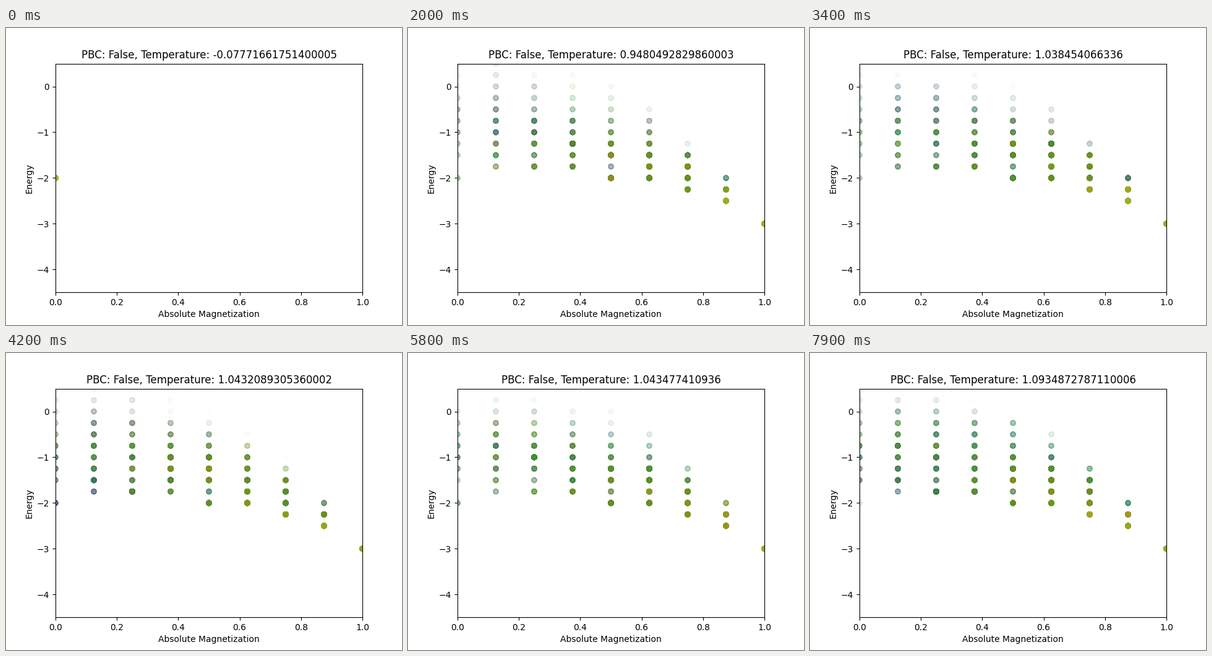
Recreate the animation shown at these times as a matplotlib script. Size 640x480 px, loop 8000 ms.

```python
import math
import random

import numpy as np
import matplotlib.pyplot as plt
from matplotlib.animation import FuncAnimation

SIDE, SPINS, STEPS, FRAMES = 4, 16, 10000, 80
ALPHA, RECENT, EARLY = 0.01, 160, 40

# quintic sweep that lingers near the critical point
temps = [float(t) for t in
         1000 * (np.arange(-0.257, 0.2, 0.005)[:FRAMES]) ** 5 + 1.043438275543]


def neighbours(i):
    r, c = divmod(i, SIDE)
    cells = ((r - 1, c), (r + 1, c), (r, c - 1), (r, c + 1))
    return [y * SIDE + x for y, x in cells if 0 <= y < SIDE and 0 <= x < SIDE]


LINKS = [neighbours(i) for i in range(SPINS)]


def metropolis(spins, temp, rng):
    """Run single-spin updates in place; return magnetisation and energy sums."""
    heat = max(temp, 1e-3)
    accept = {k: math.exp(-k / heat) if k > 0 else 1.0 for k in range(-4, 5)}
    mag = sum(spins)
    energy = -sum(spins[i] * spins[j] for i in range(SPINS) for j in LINKS[i]) // 2
    mags, energies = [], []
    rand = rng.random
    for _ in range(STEPS):
        i = int(rand() * SPINS)
        s = spins[i]
        field = 0
        for j in LINKS[i]:
            field += spins[j]
        field *= s
        if field <= 0 or rand() < accept[field]:
            spins[i] = -s
            mag -= 2 * s
            energy += 2 * field
        mags.append(abs(mag))
        energies.append(energy)
    return np.array(mags), np.array(energies)


def thin(mags, energies):
    """Drop hidden layers of crowded cells, keeping a few stronger early ones."""
    keep, alphas = [], []
    keys = mags * 100 + energies
    for key in np.unique(keys):
        idx = np.flatnonzero(keys == key)
        weight = np.full(len(idx), ALPHA)
        if len(idx) > RECENT + EARLY:
            old = idx[:-RECENT]
            old = old[np.linspace(0, len(old) - 1, EARLY).astype(int)]
            idx = np.concatenate([old, idx[-RECENT:]])
            weight = np.repeat([0.08, ALPHA], [EARLY, RECENT])
        keep.append(idx)
        alphas.append(weight)
    keep, alphas = np.concatenate(keep), np.concatenate(alphas)
    return keep, alphas


def simulate():
    rng = random.Random(11)
    spins = [1] * (SPINS // 2) + [-1] * (SPINS // 2)
    runs = []
    for temp in temps:
        mags, energies = metropolis(spins, temp, rng)
        keep, alphas = thin(mags, energies)
        points = np.column_stack([mags[keep] / SPINS, 2 * energies[keep] / SPINS])
        colors = plt.cm.viridis(keep / (STEPS - 1))
        colors[:, 3] = alphas
        runs.append((points, colors))
    return runs


runs = simulate()

fig, ax = plt.subplots(figsize=(6.4, 4.8), dpi=100)
ax.set(xlim=(0, 1), ylim=(-4.5, 0.5),
       xlabel="Absolute Magnetization", ylabel="Energy")
dots = ax.scatter([0], [0])
title = ax.set_title("")


def update(frame):
    points, colors = runs[frame]
    dots.set_offsets(points)
    dots.set_color(colors)
    title.set_text(f"PBC: False, Temperature: {temps[frame]}")
    return dots, title


anim = FuncAnimation(fig, update, frames=FRAMES, interval=100, repeat=True)
plt.show()
```
